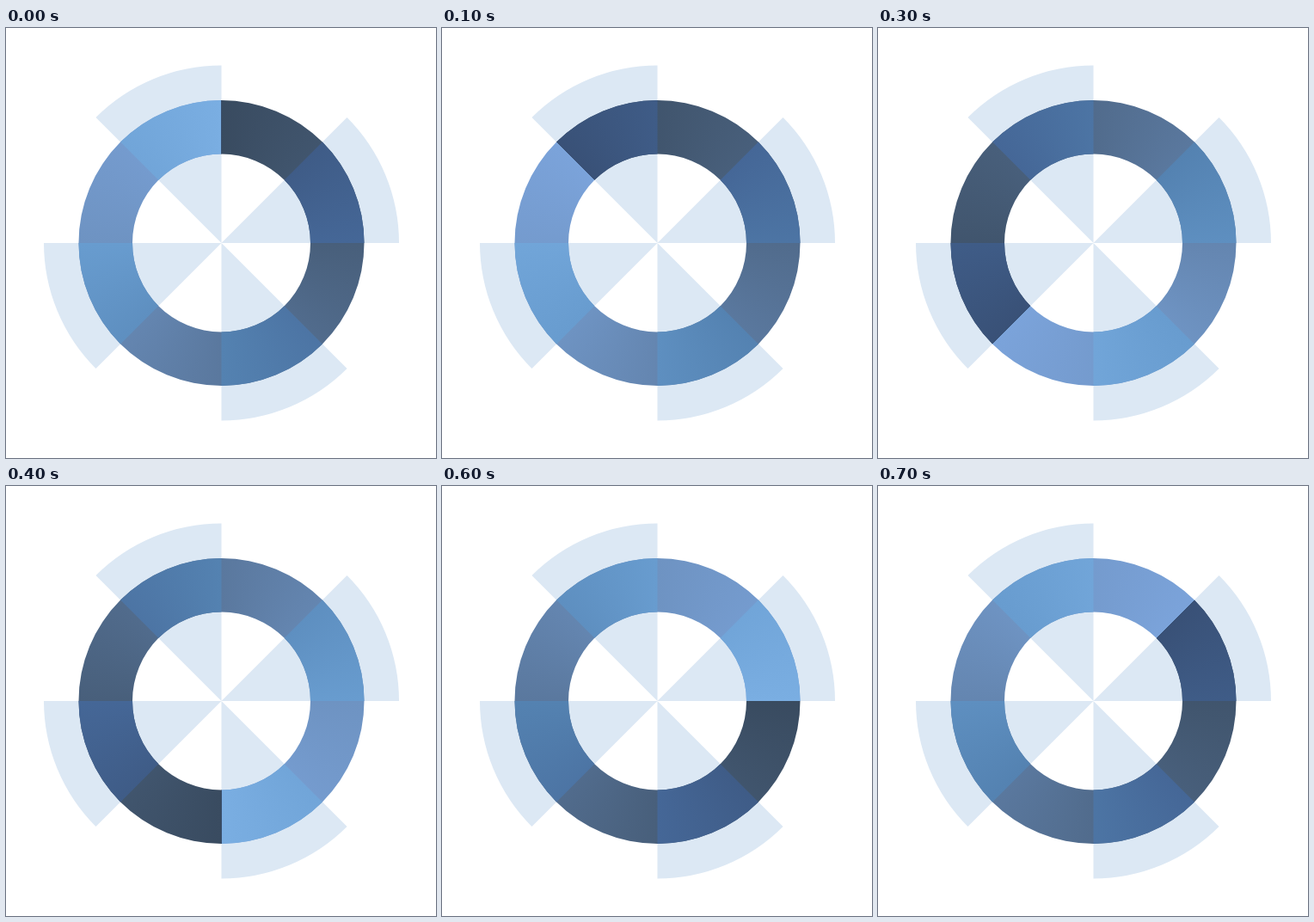
An HTML page with a canvas that plays this animation: 500x500 px, repeating every 0.8 s.

```html
<!DOCTYPE html>
<html lang="en">
<head>
<meta charset="utf-8">
<title>Spinner</title>
<style>
  html, body { margin: 0; width: 100%; height: 100%; overflow: hidden; background: #fff; }
  canvas { display: block; width: 500px; height: 500px; }
</style>
</head>
<body>
<canvas id="stage" width="500" height="500"></canvas>
<script>
const ctx = document.getElementById('stage').getContext('2d');
const CX = 250.5, CY = 250;
const INNER = 103.5, OUTER = 166, BLADE = 206.5;
const STEP = Math.PI / 4, TOP = -Math.PI / 2;
const STEPS = 8, STEP_MS = 100;

// Ramps run clockwise from the dark end to the light end.
const PLAIN = ['rgb(57,75,96)', 'rgb(72,95,123)', 'rgb(90,120,158)', 'rgb(110,147,194)', 'rgb(123,163,218)'];
const TINTED = ['rgb(57,81,119)', 'rgb(69,103,151)', 'rgb(84,130,177)', 'rgb(104,156,207)', 'rgb(122,174,226)'];

function ramp(colors, angle) {
  const g = ctx.createConicGradient(angle, CX, CY);
  colors.forEach((c, i) => g.addColorStop(i / (colors.length - 1), c));
  return g;
}

function sector(r0, r1, from, to) {
  ctx.moveTo(CX + r1 * Math.cos(from), CY + r1 * Math.sin(from));
  ctx.arc(CX, CY, r1, from, to);
  if (r0) ctx.arc(CX, CY, r0, to, from, true);
  else ctx.lineTo(CX, CY);
  ctx.closePath();
}

function blades(r0, r1, fill) {
  ctx.beginPath();
  for (let i = 1; i < STEPS; i += 2) {
    const a = TOP + i * STEP;
    sector(r0, r1, a, a + STEP);
  }
  ctx.fillStyle = fill;
  ctx.fill();
}

function draw(now) {
  const step = Math.floor(now / STEP_MS) % STEPS;
  const start = TOP - step * STEP;

  ctx.fillStyle = '#fff';
  ctx.fillRect(0, 0, 500, 500);
  blades(0, BLADE, '#dce8f4');

  ctx.beginPath();
  sector(INNER, OUTER, TOP, TOP + 2 * Math.PI);
  ctx.fillStyle = ramp(PLAIN, start);
  ctx.fill();
  blades(INNER, OUTER, ramp(TINTED, start));
}

const t0 = performance.now();
function tick() {
  draw(performance.now() - t0);
  requestAnimationFrame(tick);
}
tick();
</script>
</body>
</html>
```
